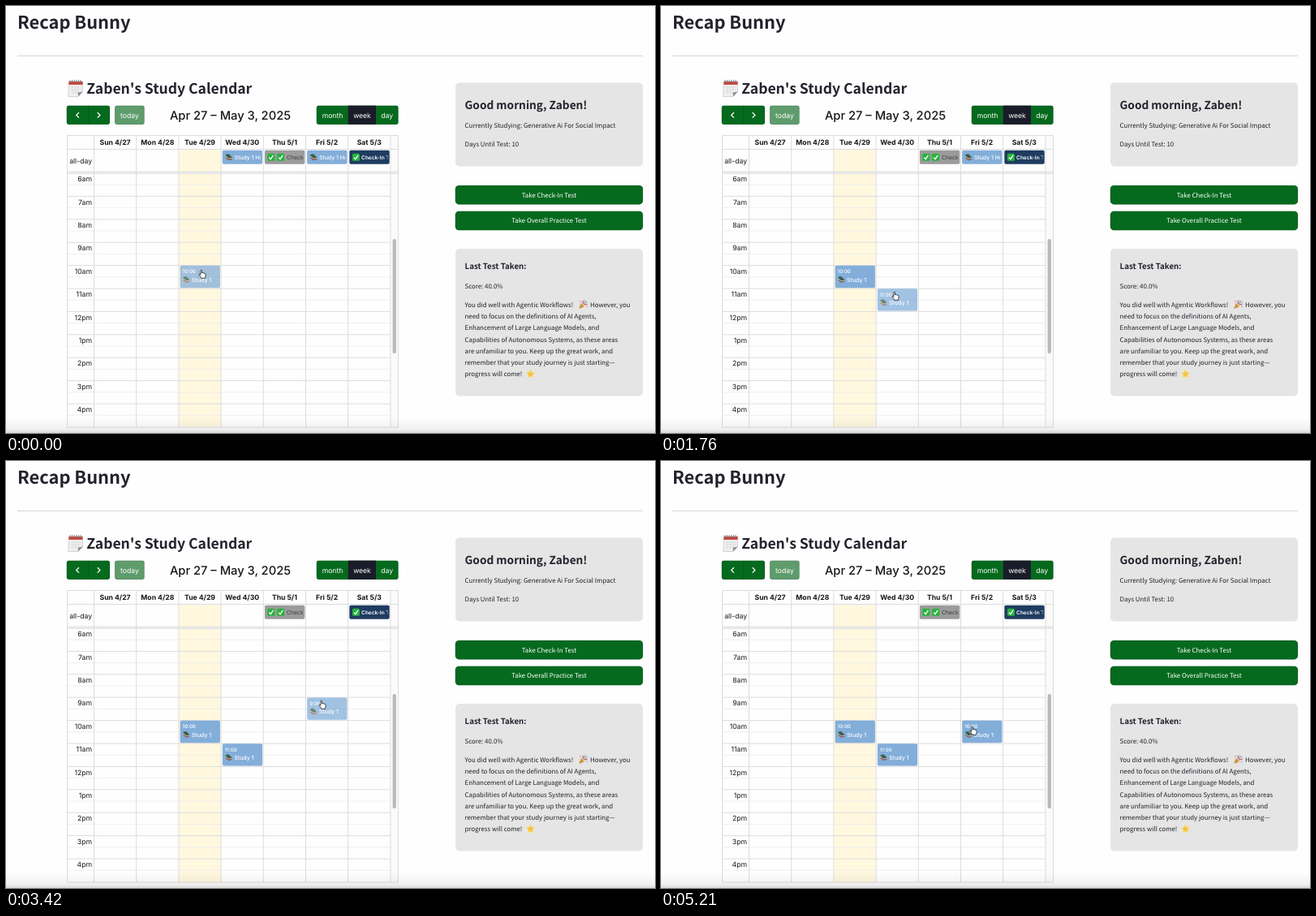
These frames come from a looping animation (800x526 px, 5.24 s). An HTML page:

```html
<!DOCTYPE html>
<html lang="en">
<head>
<meta charset="utf-8">
<title>Study calendar</title>
<style>
  html, body { margin: 0; width: 100%; height: 100%; overflow: hidden; background: #fefefe; }
  svg { display: block; }
  #stage { width: 800px; height: 526px; }
  text { white-space: pre; text-rendering: geometricPrecision; }
  .page { font-family: "Noto Sans CJK JP", "Noto Sans CJK SC", "Noto Sans CJK", "Noto Sans", sans-serif; fill: #22232c; }
  .cal { font-family: Inter, "Liberation Sans", sans-serif; fill: #17171b; }
</style>
</head>
<body>
<svg id="stage" viewBox="0 0 800 526">
  <defs>
    <linearGradient id="shade" x2="0" y2="1">
      <stop offset="0" stop-opacity="0"/>
      <stop offset=".75" stop-opacity=".05"/>
      <stop offset="1" stop-opacity=".15"/>
    </linearGradient>
    <g id="books">
      <path d="M.4 1.6 4.4.6 8.4 4.4 8.6 6 4.6 7 .8 3.4z" fill="#3c5f48"/>
      <path d="M.6 3.2 4.6 6.6 8.6 5.6V7L4.8 7.8.8 4.8z" fill="#d8c9a0"/>
      <path d="M.8 4.6 4.8 7.6 8.6 6.6V8L4.8 9 1 6.4z" fill="#8b4a45"/>
    </g>
    <g id="check">
      <rect width="9" height="9" rx="1.6" fill="#26b43c"/>
      <path d="M2 4.8 3.9 6.9 7.1 2" fill="none" stroke="#fff" stroke-width="1.3"/>
    </g>
    <g id="party">
      <path d="M.5 11 3.4 3.8 7.4 8z" fill="#e0a93a"/>
      <path d="M1.5 8.4 4 10M2.5 6 6 9" stroke="#b0652a" stroke-width=".9"/>
      <path d="M5 4.4C7 3.8 6.4 1.6 5 1M7 6.4C8 4.8 10 6 11 5" fill="none" stroke="#cc4b52" stroke-width="1.1"/>
      <path d="M6.2 5.6 9.6 1.6" stroke="#4b86c4" stroke-width="1"/>
      <g fill="#d85a86"><circle cx="2.4" cy="2" r=".7"/><circle cx="10.4" cy="8" r=".7"/></g>
      <g fill="#5ca75a"><circle cx="8" cy=".9" r=".6"/><circle cx="10.6" cy="2.8" r=".6"/></g>
    </g>
    <path id="star" d="M5.5.3 7.2 3.7 11 4.2 8.2 6.8 8.9 10.6 5.5 8.8 2.1 10.6 2.8 6.8 0 4.2 3.8 3.7z" fill="#f4c542" stroke="#fbe49a" stroke-width=".8"/>
    <g id="pad">
      <path d="M1.5 2H18.5V15L13 20.5H.8z" fill="#f1f1f1" stroke="#b9b9bb" stroke-width=".6"/>
      <path d="M18.5 14.5 13 20.5 12.6 15.6z" fill="#8f8f93"/>
      <path d="M1.5 2H18.5V6H1.3z" fill="#c8473f"/>
      <path d="M3 0V4M5.6 0V4M8.2 0V4M10.8 0V4M13.4 0V4M16 0V4" stroke="#77777b" stroke-width=".9"/>
      <path d="M3 9H17M3 12H17M3 15H12M6 7V18M9.5 7V18M13 7V15" stroke="#d6d6d9" stroke-width=".6"/>
    </g>
    <path id="hand" d="M2.4 6.8V1.6c0-1.2 1.6-1.2 1.6 0V4.4c.3-.8 1.5-.6 1.6.2.4-.6 1.4-.4 1.5.4.5-.4 1.4-.1 1.4.8V8c0 1.2-.7 1.5-.8 2.8H3.3C3 9.2 1.2 8 .5 6.7c-.4-.8.5-1.4 1.1-.8z"
      fill="#fff" stroke="#111" stroke-width=".75" stroke-linejoin="round"/>
  </defs>
  <g id="base"></g>
  <g id="live"></g>
  <rect y="506" width="800" height="20" fill="url(#shade)"/>
</svg>
<script>
const LOOP = 5240;
const LEFT = 75.5, RIGHT = 483.5, GRID_X = 108.5, COL = 52.2;
const BODY_TOP = 206, BODY_BOTTOM = 519, HOUR = 28.4, FIRST_HOUR = 6;
const GREEN = '#056a1e', LINE = '#dcdcde', BLUE = '#83aeda';

const colX = day => GRID_X + day * COL;
const rect = (x, y, w, h, fill, rx = 0) =>
  `<rect x="${x}" y="${y}" width="${w}" height="${h}" rx="${rx}" fill="${fill}"/>`;
const path = (d, color = LINE, width = 1) =>
  `<path d="${d}" fill="none" stroke="${color}" stroke-width="${width}"/>`;
const icon = (id, x, y, scale = 1) =>
  `<use href="#${id}" transform="translate(${x} ${y}) scale(${scale})"/>`;

// A filled box with a slightly darker rim
const buttonBox = (x, y, w, h, fill, rx) => rect(x, y, w, h, fill, rx) +
  `<rect x="${x + .3}" y="${y + .3}" width="${w - .6}" height="${h - .6}" rx="${rx}" fill="none" stroke="#31333f" stroke-opacity=".25" stroke-width=".6"/>`;

function text(kind, x, y, size, str, { weight = 400, anchor = 'start', fill = '' } = {}) {
  const style = fill ? ` style="fill:${fill}"` : '';
  return `<text class="${kind}" x="${x}" y="${y}" font-size="${size}" font-weight="${weight}" text-anchor="${anchor}"${style}>${str}</text>`;
}
const page = (...args) => text('page', ...args);
const cal = (...args) => text('cal', ...args);
const body = (x, y, str, options = {}) => page(x, y, 7.87, str, { weight: 500, ...options });

function sidePanel() {
  const button = (y, label) => buttonBox(553.8, y, 231.3, 23.4, GREEN, 4.4) +
    body(669.5, y + 14.6, label, { anchor: 'middle', fill: '#fff' });
  const advice = [
    'You did well with Agentic Workflows!',
    'need to focus on the definitions of AI Agents,',
    'Enhancement of Large Language Models, and',
    'Capabilities of Autonomous Systems, as these areas',
    'are unfamiliar to you. Keep up the great work, and',
    'remember that your study journey is just starting—',
    'progress will come!'
  ];
  return rect(554, 94.5, 231, 103, '#e5e5e5', 5) +
    page(565.5, 127, 13.7, 'Good morning, Zaben!', { weight: 700 }) +
    body(565.5, 150, 'Currently Studying: Generative Ai For Social Impact') +
    body(565.5, 173.4, 'Days Until Test: 10') +
    button(221, 'Take Check-In Test') + button(252.8, 'Take Overall Practice Test') +
    rect(554, 299, 231, 181.5, '#e5e5e5', 5) +
    page(565.5, 323.6, 9.75, 'Last Test Taken:', { weight: 700 }) +
    body(565.5, 348, 'Score: 40.0%') +
    advice.map((line, i) => body(565.5, 371 + i * 14.22, line)).join('') +
    icon('party', 705.5, 362) + body(720, 371, 'However, you') + icon('star', 641, 447.5);
}

function toolbar() {
  const white = { anchor: 'middle', fill: '#fff' };
  return buttonBox(74.8, 122.7, 53.2, 23.2, GREEN, 2.4) + path('M101.5 123V145.7', '#04551a', .7) +
    path('M89.9 131.2 86.7 134.4 89.9 137.6M112.7 131.2 115.9 134.4 112.7 137.6', '#fff', 1.3) +
    buttonBox(134.1, 122.7, 36.5, 23.2, '#5e9c6c', 2.4) + cal(152.4, 137.5, 8.65, 'today', white) +
    cal(276.5, 139.8, 14.7, 'Apr 27 – May 3, 2025', { weight: 500, anchor: 'middle' }) +
    buttonBox(382.8, 122.7, 100.8, 23.2, GREEN, 2.4) + rect(421.8, 122.7, 34.2, 23.2, '#1a1c29') +
    cal(402.5, 137.5, 8.65, 'month', white) + cal(439, 137.5, 8.65, 'week', white) +
    cal(469.6, 137.5, 8.65, 'day', white);
}

function grid() {
  const days = ['Sun 4/27', 'Mon 4/28', 'Tue 4/29', 'Wed 4/30', 'Thu 5/1', 'Fri 5/2', 'Sat 5/3'];
  const hours = ['6am', '7am', '8am', '9am', '10am', '11am', '12pm', '1pm', '2pm', '3pm', '4pm'];
  let out = rect(474, 160, 9.5, 359, '#fafafa') + rect(colX(2), 177, COL, 342, '#fff8df');
  hours.forEach((label, i) => {
    const y = BODY_TOP + i * HOUR;
    if (i) out += path(`M${LEFT} ${y}H474`);
    out += path(`M${LEFT} ${y + HOUR / 2}H474`, '#ebebec', .8);
    out += cal(106, y + 10.2, 8.65, label, { anchor: 'end' });
  });
  out += rect(LEFT, 204, RIGHT - LEFT, 2.4, '#f4f4f4');
  out += path(`M${LEFT} 159.5H${RIGHT}V${BODY_BOTTOM}H${LEFT}ZM${LEFT} 176.5H${RIGHT}M${LEFT} 204.2H${RIGHT}M${LEFT} 206.3H${RIGHT}`);
  for (let day = 0; day <= 7; day++) out += path(`M${colX(day)} 159.5V${BODY_BOTTOM}`);
  days.forEach((label, i) =>
    out += cal(colX(i) + COL / 2, 171.3, 8.65, label, { weight: 700, anchor: 'middle' }));
  return out + cal(106, 193.6, 8.65, 'all-day', { anchor: 'end' }) +
    rect(476.6, 287, 4.3, 141, '#b9b9bb', 2.1);
}

// The inner svg clips long labels just short of the box edge.
function eventBox(x, y, w, h, fill, opacity, content) {
  return `<g transform="translate(${x} ${y})" opacity="${opacity}">${rect(0, 0, w, h, fill, 1.8)}<svg width="${w - 2.4}" height="${h}">${content}</svg></g>`;
}
const allDay = (day, fill, content, opacity = 1) =>
  eventBox(colX(day) + 1.6, 177.8, 49.4, 17, fill, opacity, content);

function studyEvent(day, hour, dragging) {
  const opacity = dragging ? .75 : 1, white = { weight: 500, fill: '#fff' };
  if (hour === null) {
    return allDay(day, BLUE, icon('books', 3.6, 3.8, .95) + cal(14.8, 10.8, 6.9, 'Study 1 Hour', white), opacity);
  }
  return eventBox(colX(day) + 1.7, BODY_TOP + (hour - FIRST_HOUR) * HOUR + .2, 49.3, 27.4, BLUE, opacity,
    cal(3, 9.7, 6.1, hour + ':00', white) + icon('books', 3.4, 12.6, .92) +
    cal(14.5, 20.1, 6.95, 'Study 1', white));
}

document.getElementById('base').innerHTML =
  rect(0, 0, 800, 526, '#fefefe') +
  page(14, 28, 21.8, 'Recap Bunny', { weight: 700 }) + path('M14 61.5H785', '#d6d6d9') +
  icon('pad', 76, 91) + page(99.3, 108.3, 17.55, "Zaben's Study Calendar", { weight: 700 }) +
  toolbar() + grid() + sidePanel() +
  allDay(4, '#9b9b9b', icon('check', 3.4, 4) + icon('check', 15.2, 4) +
    cal(27, 10.8, 6.9, 'Check-In', { fill: '#3c3c3c' })) +
  allDay(6, '#1f3c60', icon('check', 3.6, 4) +
    cal(14.8, 10.8, 6.5, 'Check-In Test', { weight: 600, fill: '#fff' }));

// Cursor stops: time, x, y
const stops = [
  [0, 242, 330], [150, 242, 330], [500, 291, 188], [620, 291, 188],
  [1060, 288, 286], [1760, 289, 357], [1950, 289, 357], [2350, 396, 188],
  [2480, 396, 188], [2910, 390, 226], [3420, 390, 300], [3620, 388, 331],
  [4030, 385, 332], [LOOP, 385, 332]
];
const drags = [
  { day: 2, grab: -1, drop: 150, end: 10 },
  { day: 3, grab: 620, drop: 1900, end: 11 },
  { day: 5, grab: 2480, drop: 3750, end: 10 }
];

function cursorAt(t) {
  const i = Math.max(1, stops.findIndex(stop => stop[0] > t));
  const [t0, x0, y0] = stops[i - 1], [t1, x1, y1] = stops[i];
  const p = (t - t0) / (t1 - t0), eased = p * p * (3 - 2 * p);
  return [x0 + (x1 - x0) * eased, y0 + (y1 - y0) * eased];
}

function hourUnder(y) {
  return y < BODY_TOP ? null : FIRST_HOUR + Math.floor((y - BODY_TOP) / HOUR);
}

const live = document.getElementById('live');
function draw(t) {
  const [x, y] = cursorAt(t);
  live.innerHTML = drags.map(({ day, grab, drop, end }) => {
    const dragging = t >= grab && t < drop;
    const hour = t < grab ? null : dragging ? hourUnder(y - 4) : end;
    return studyEvent(day, hour, dragging);
  }).join('') + icon('hand', x - 4.5, y - 5.5);
}

const start = performance.now();
function tick() {
  draw((performance.now() - start) % LOOP);
  requestAnimationFrame(tick);
}
tick();
</script>
</body>
</html>
```
